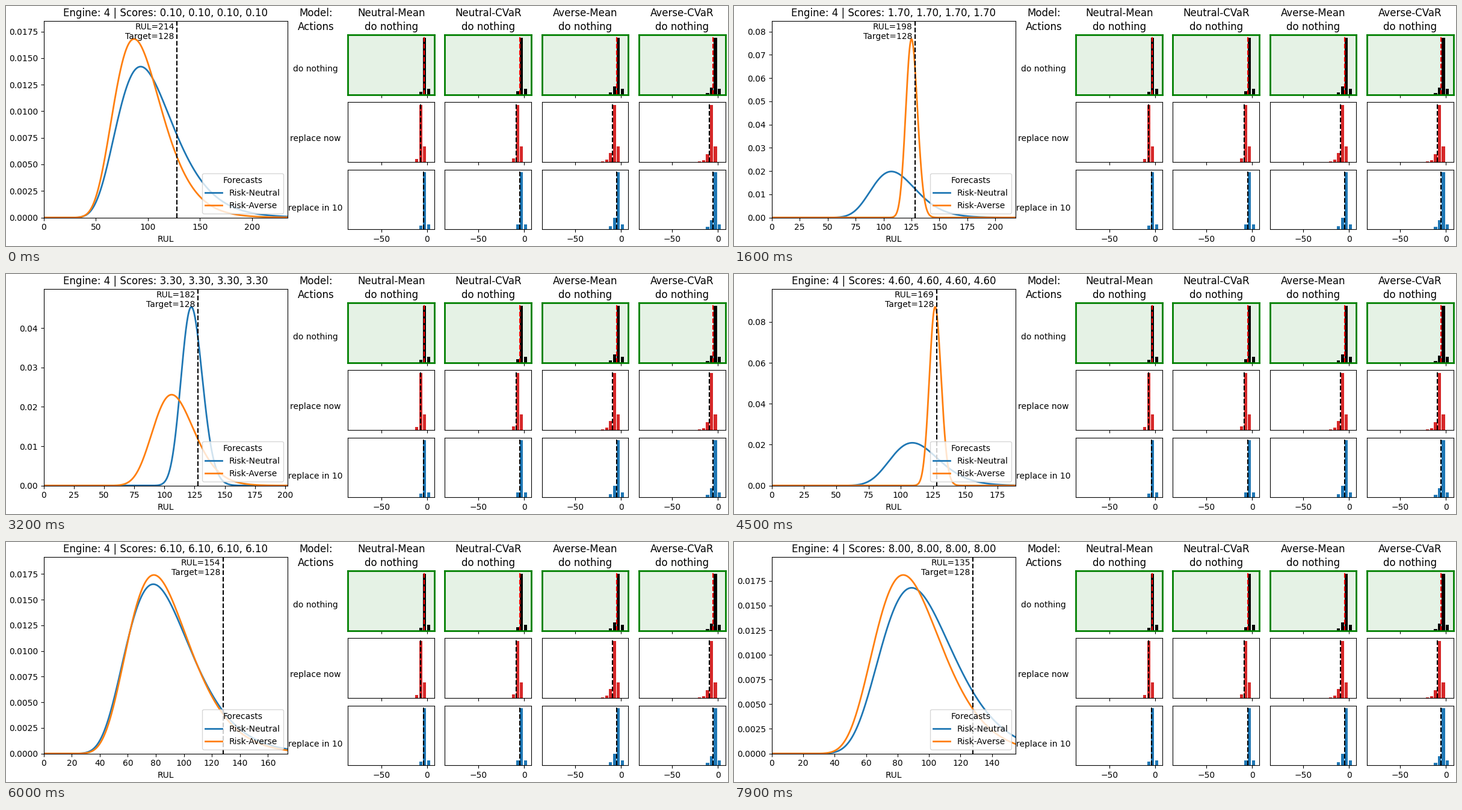
Animation of 1200 by 400 pixels, one loop 8000 ms. Source, as a matplotlib script:

```python
import numpy as np
import matplotlib.pyplot as plt
from matplotlib.animation import FuncAnimation

W, H, DPI = 1200, 400, 100
FRAMES, INTERVAL = 80, 100
START_RUL, TARGET = 214, 128

plt.rcParams["font.family"] = "DejaVu Sans"
fig = plt.figure(figsize=(W / DPI, H / DPI), dpi=DPI, facecolor="white")

# Forecast key points: the mode and peak density at a few steps
STEPS = [0, 16, 32, 45, 60, 70, 79]
NEUTRAL = ([93, 107, 122.3, 109, 78.2, 82, 89],
           [.0142, .0198, .0454, .0209, .0165, .021, .0168])
AVERSE = ([86.7, 125, 106, 126.7, 78.6, 75.5, 83.6],
          [.0168, .0768, .0231, .0874, .0174, .0167, .0181])

# Action panels, in pixels
PANEL_X, PANEL_Y = 568.3, 48
PANEL_W, PANEL_H = 143.9, 99.5
STEP_X, STEP_Y = 161.1, 112.3
LABEL_X = 514.5

# Histograms
FIRST_BIN, BIN, DECAY = 1.5, 4.3, .25
MODELS = [
    dict(name="Neutral-Mean", tail=.05, bars=1, lean=0),
    dict(name="Neutral-CVaR", tail=.065, bars=1, lean=1.2),
    dict(name="Averse-Mean", tail=.16, bars=2, lean=1.4),
    dict(name="Averse-CVaR", tail=.13, bars=2, lean=1.8),
]
ACTIONS = [
    dict(name="do nothing", color="black", best=.1, scale=.9, shift=0,
         mark=-3.3, spread=1),
    dict(name="replace now", color="tab:red", best=.27, scale=1, shift=1,
         mark=-7.3, spread=1.2),
    dict(name="replace in 10", color="tab:blue", best=.09, scale=1.25, shift=0,
         mark=-4, spread=.6),
]


def add_axes(left, top, width, height):
    return fig.add_axes([left / W, 1 - (top + height) / H,
                         width / W, height / H])


def heading(x, top, bottom):
    for text, baseline in ((top, 17), (bottom, 40)):
        fig.text(x / W, 1 - baseline / H, text, size=12,
                 ha="center", va="baseline")


def draw_panel(row, col):
    action, model = ACTIONS[row], MODELS[col]
    ax = add_axes(PANEL_X + col * STEP_X, PANEL_Y + row * STEP_Y,
                  PANEL_W, PANEL_H)
    count = model["bars"]
    if count > 1:
        count += action["shift"]
    tail = action["scale"] * model["tail"] * DECAY ** np.arange(count)
    heights = [action["best"], 1, *tail]
    centers = FIRST_BIN - BIN * (action["shift"] + np.arange(len(heights)))
    ax.bar(centers, heights, width=.8 * BIN, color=action["color"])
    chosen = row == 0
    ax.axvline(action["mark"] - action["spread"] * model["lean"],
               color="red" if chosen else "black", ls="--")
    ax.set(xlim=(-86.7, 8.1), ylim=(0, 1.05), xticks=[-50, 0], yticks=[])
    ax.tick_params(labelbottom=row == len(ACTIONS) - 1)
    if chosen:
        ax.set_facecolor(("green", .1))
        for spine in ax.spines.values():
            spine.set(color="green", linewidth=2)


def draw_labels():
    heading(515, "Model:", "Actions")
    ax = add_axes(470, PANEL_Y, 89, 324)
    ax.axis("off")
    ax.set(xlim=(470, 559), ylim=(PANEL_Y + 324, PANEL_Y))
    for row, action in enumerate(ACTIONS):
        ax.text(LABEL_X, 104.7 + 116.2 * row, action["name"], size=10,
                ha="center", va="center", clip_on=True)


def forecast(keys, step, x):
    """Log-normal density with the mode and peak reached at this step."""
    modes, peaks = keys
    mode = np.interp(step, STEPS, modes)
    peak = np.exp(np.interp(step, STEPS, np.log(peaks)))
    scale = 1 / (mode * peak * np.sqrt(2 * np.pi))
    sigma = scale
    for _ in range(20):
        sigma = scale * np.exp(-sigma ** 2 / 2)
    return peak * np.exp(-np.log(x / mode) ** 2 / (2 * sigma ** 2))


draw_labels()
for col, model in enumerate(MODELS):
    heading(PANEL_X + col * STEP_X + PANEL_W / 2, model["name"], "do nothing")
    for row in range(len(ACTIONS)):
        draw_panel(row, col)

main = add_axes(62.8, 25.2, 405, 327.35)
main.set_xlabel("RUL")
title = main.set_title("", size=12)
neutral_line, = main.plot([], [], lw=2, color="tab:blue", label="Risk-Neutral")
averse_line, = main.plot([], [], lw=2, color="tab:orange", label="Risk-Averse")
main.axvline(TARGET, color="black", ls="--")
note = main.annotate("", xy=(TARGET, 1), xycoords=main.get_xaxis_transform(),
                     xytext=(-3.3, -1.7), textcoords="offset points",
                     size=10, ha="right", va="top")
main.legend(title="Forecasts", loc="lower right")


def update(step):
    rul = START_RUL - step
    x = np.linspace(.01, rul + 20, 500)
    neutral = forecast(NEUTRAL, step, x)
    averse = forecast(AVERSE, step, x)
    neutral_line.set_data(x, neutral)
    averse_line.set_data(x, averse)
    main.set_xlim(0, rul + 20)
    main.set_ylim(0, 1.1 * max(neutral.max(), averse.max()))
    score = f"{(step + 1) / 10:.2f}"
    title.set_text("Engine: 4 | Scores: " + ", ".join([score] * 4))
    note.set_text(f"RUL={rul}\nTarget={TARGET}")
    return neutral_line, averse_line, title, note


anim = FuncAnimation(fig, update, frames=FRAMES, interval=INTERVAL,
                     repeat=True, blit=False)
plt.show()
```
